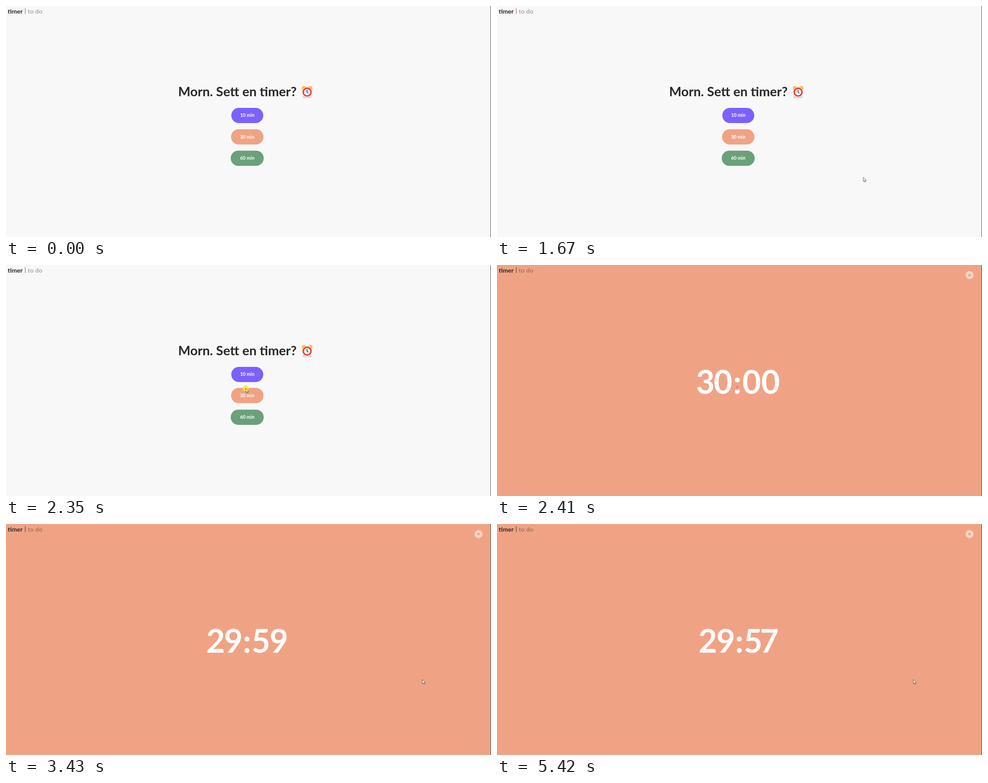
Animation, 1084 px wide and 517 px high, one loop 6.15 s. Source, as an HTML page:

```html
<!DOCTYPE html>
<html lang="no">
<head>
<meta charset="utf-8">
<title>Timer</title>
<style>
  html, body { margin: 0; width: 100%; height: 100%; overflow: hidden; background: #f8f8f8; }
  svg { display: block; width: 100%; height: 100%; }
  text { font-family: Lato, "Open Sans", sans-serif; font-weight: 700; }

  .nav { font-size: 14px; }
  .title { font-size: 29px; fill: #282828; }
  .label { font-size: 10.5px; fill: #fff; text-anchor: middle; }
  .count { font-size: 72px; fill: #fff; text-anchor: middle; }

  /* Everything shares one 6150 ms loop */
  .home, .run, .t0, .t1, .t2, .t3, .click, .beam, .arrow, .hover {
    animation: 6150ms step-end infinite;
  }
  .home  { animation-name: home; }
  .run   { animation-name: run; }
  .t0    { animation-name: t0; }
  .t1    { animation-name: t1; }
  .t2    { animation-name: t2; }
  .t3    { animation-name: t3; }
  .click { animation-name: click; }
  .beam  { animation-name: beam; }
  .arrow { animation-name: arrow; }
  .hover { animation-name: hover; }
  .pointer { animation: move 6150ms infinite; }

  @keyframes home  { 0% { visibility: visible } 39.187%, 100% { visibility: hidden } }
  @keyframes run   { 0% { visibility: hidden } 39.187%, 100% { visibility: visible } }
  @keyframes t0    { 0%, 55.772%, 100% { visibility: hidden } 39.187% { visibility: visible } }
  @keyframes t1    { 0%, 72.033%, 100% { visibility: hidden } 55.772% { visibility: visible } }
  @keyframes t2    { 0%, 88.13%, 100% { visibility: hidden } 72.033% { visibility: visible } }
  @keyframes t3    { 0% { visibility: hidden } 88.13%, 100% { visibility: visible } }
  @keyframes click { 0%, 39.187%, 100% { visibility: hidden } 38.211% { visibility: visible } }
  @keyframes beam  { 0%, 43.55%, 100% { visibility: hidden } 39.187% { visibility: visible } }
  @keyframes arrow {
    0%, 39.187% { visibility: hidden }
    17.236%, 43.55%, 100% { visibility: visible }
  }
  @keyframes hover {
    0%, 39.187%, 100% { transform: none }
    35.93% { transform: translateY(-.6px) }
  }

  /* The pointer advances in steps of about 68 ms */
  @keyframes move {
    0%, 17.236% { transform: translate(1077px, 510px); animation-timing-function: steps(9) }
    27.154% { transform: translate(818.8px, 383.3px); animation-timing-function: steps(4) }
    31.6%   { transform: translate(650px, 319px); animation-timing-function: steps(4) }
    35.93%, 40.24% { transform: translate(535.8px, 275.8px); animation-timing-function: steps(7) }
    47.967% { transform: translate(760px, 318px); animation-timing-function: steps(5) }
    53.49%, 100% { transform: translate(930.6px, 348px) }
  }
</style>
</head>
<body>
<svg viewBox="0 0 1084 517" preserveAspectRatio="none">
  <rect width="1084" height="517" fill="#f8f8f8"/>

  <g class="home">
    <g class="nav">
      <text x="3.8" y="16.6" fill="#232529">timer</text>
      <rect x="42.5" y="5" width="1.2" height="13" fill="#c4614c"/>
      <text x="48.6" y="16.6" fill="#a8a8a4">to do</text>
    </g>

    <text class="title" x="384.8" y="202.4">Morn. Sett en timer?</text>

    <g class="clock">
      <path d="M663 206V203.5Q663 201 666 201H680Q682.500 201 682.500 203.500V206Z" fill="#d3d5d6"/>
      <circle cx="666" cy="184" r="5" fill="#fdbd4b"/>
      <circle cx="680" cy="184" r="5" fill="#fdbd4b"/>
      <circle cx="673" cy="192.700" r="11.300" fill="#f8f8f8"/>
      <circle cx="673" cy="192.700" r="8.700" fill="#fafafa" stroke="#ef3e36" stroke-width="3.400"/>
      <path d="M672.700 187.500V193L676 195.200" fill="none" stroke="#333" stroke-width="1.500"/>
    </g>

    <rect x="503.5" y="228" width="71.500" height="34" rx="17" fill="#7b61ff"/>
    <text class="label" x="539.3" y="248.4">10 min</text>
    <g class="hover">
      <rect x="503" y="275.700" width="72.500" height="34.300" rx="17.100" fill="#f0a384"/>
      <text class="label" x="539.3" y="296.600">30 min</text>
    </g>
    <rect x="502.2" y="323.700" width="73.800" height="34.100" rx="17" fill="#6aa07a"/>
    <text class="label" x="539.3" y="344.400">60 min</text>
  </g>

  <g class="run">
    <rect width="1084" height="517" fill="#f0a384"/>
    <g class="nav">
      <text x="3.8" y="16.6" fill="#29282a">timer</text>
      <rect x="42.5" y="5" width="1.2" height="13" fill="#4f3b35"/>
      <text x="48.6" y="16.6" fill="#a8725d">to do</text>
    </g>
    <circle cx="1056.100" cy="22.600" r="9.100" fill="#f7d1c1"/>
    <path d="M1054 20.500l4.200 4.200m0-4.200l-4.200 4.200" stroke="#75564b" stroke-width=".9"/>
  </g>

  <g class="count">
    <text class="t0" x="465.7 505.2 537 569.2 611.5" y="288.4">30:00</text>
    <text class="t1" x="468.5 508.2 538.6 569.6 610" y="288.4">29:59</text>
    <text class="t2" x="470 510.2 540.5 571.2 609.6" y="288.4">29:58</text>
    <text class="t3" x="471.2 511.3 541.6 572.4 608.7" y="288.4">29:57</text>
  </g>

  <g class="pointer">
    <circle class="click" r="7" fill="#f8ec25" fill-opacity=".75"/>
    <path class="arrow" d="M0 0V9.500L2.200 7.500L3.700 10.800L5.100 10.200L3.700 7H6.500Z"
      fill="#fff" stroke="#333" stroke-width=".8"/>
    <path class="beam" d="M-1.200-4H2.800M.8-4V4M-1.200 4H2.800" fill="none" stroke="#777" stroke-width=".9"/>
  </g>

  <rect x="1083" width="1" height="517" fill="#444"/>
</svg>
</body>
</html>
```
